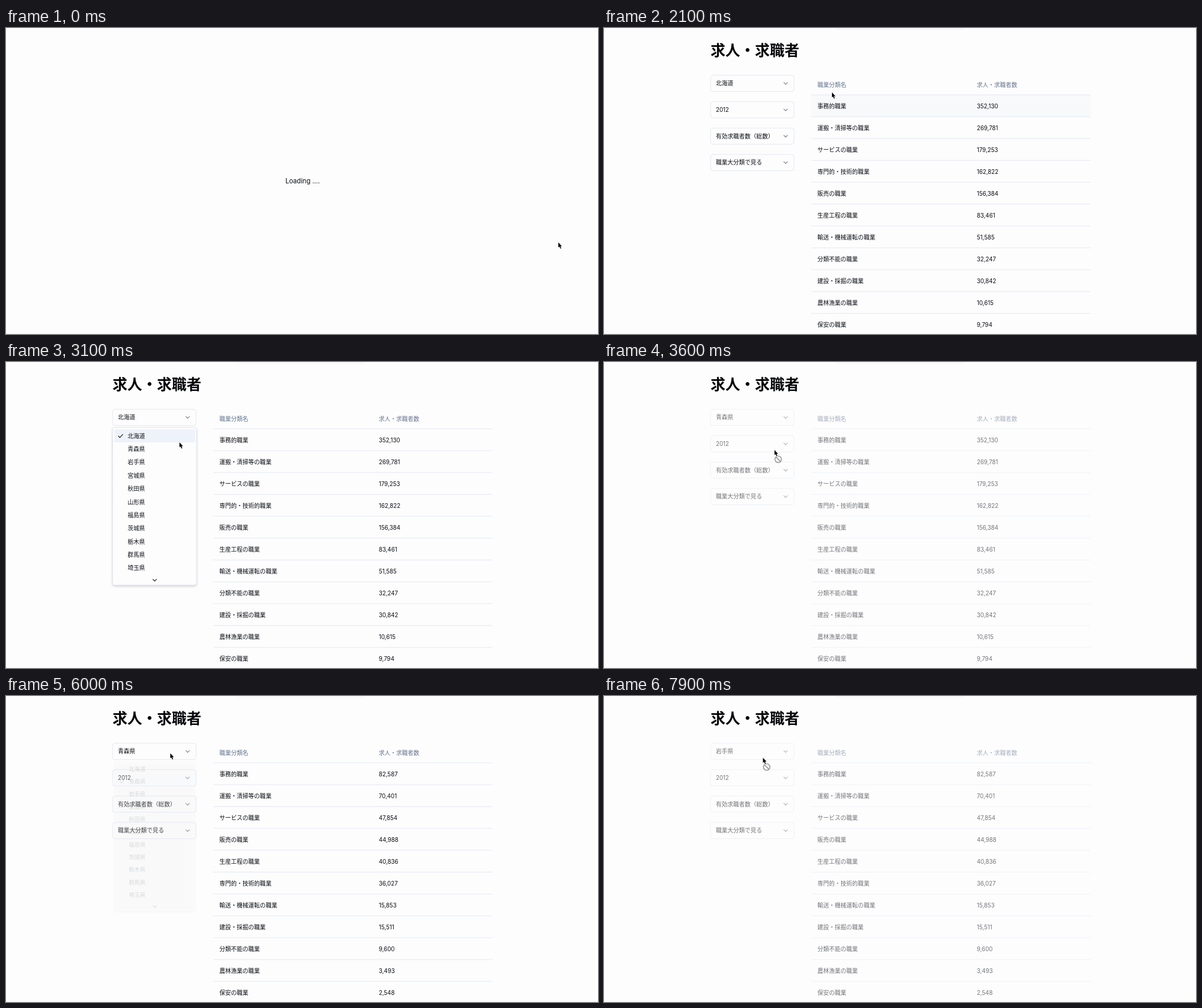
These frames come from a looping animation (1000 by 518 pixels, 8000 ms). An HTML page with a canvas:

```html
<!DOCTYPE html>
<html lang="ja">
<head>
<meta charset="utf-8">
<title>求人・求職者</title>
<style>
  html, body { margin: 0; width: 100%; height: 100%; overflow: hidden; background: #fdfdfe; }
  canvas { display: block; width: 1000px; height: 518px; }
</style>
</head>
<body>
<canvas id="stage"></canvas>
<script>
const W = 1000, H = 518, LOOP = 8000, STEP = 100;
const canvas = document.getElementById('stage');
const ratio = window.devicePixelRatio || 1;
canvas.width = W * ratio;
canvas.height = H * ratio;
const ctx = canvas.getContext('2d');

const JP = '"Noto Sans CJK JP", "Noto Sans CJK", sans-serif';
const LATIN = 'Inter, sans-serif';
const INK = '#0b0d12', MUTED = '#64748b', LINE = '#e4e8ee', PAPER = '#fdfdfe';
const SIZE = 9.78;

const PREFS = ['北海道', '青森県', '岩手県', '宮城県', '秋田県', '山形県', '福島県', '茨城県', '栃木県', '群馬県', '埼玉県'];
const FILTERS = ['2012', '有効求職者数（総数）', '職業大分類で見る'];
const TABLES = [
  [['事務的', '352,130'], ['運搬・清掃等の', '269,781'], ['サービスの', '179,253'], ['専門的・技術的', '162,822'],
   ['販売の', '156,384'], ['生産工程の', '83,461'], ['輸送・機械運転の', '51,585'], ['分類不能の', '32,247'],
   ['建設・採掘の', '30,842'], ['農林漁業の', '10,615'], ['保安の', '9,794']],
  [['事務的', '82,587'], ['運搬・清掃等の', '70,401'], ['サービスの', '47,854'], ['販売の', '44,988'],
   ['生産工程の', '40,836'], ['専門的・技術的', '36,027'], ['輸送・機械運転の', '15,853'], ['建設・採掘の', '15,511'],
   ['分類不能の', '9,600'], ['農林漁業の', '3,493'], ['保安の', '2,548']],
];

const TIMES = { ready: 1400, busy: [[3600, 5600], [6900, 8000]], menu: [[2700, 3600], [6000, 6900]] };

// Pointer path: time, x, y
const PATH = [
  [1800, 933, 363], [1900, 790, 298], [2000, 565, 190], [2100, 385, 109], [2200, 332, 98],
  [2350, 307, 94], [2500, 300, 93], [2800, 299, 94], [2900, 298, 106], [3100, 293, 136],
  [3500, 288, 149], [4100, 288, 149], [4350, 282, 123], [4600, 277, 96], [5600, 277, 96],
  [5700, 277.5, 97], [6000, 277.5, 97], [6200, 277, 124], [6400, 277.5, 160], [6600, 278, 178],
  [7600, 278, 178], [7750, 273, 143], [7900, 268.5, 104.5],
];

function pointerAt(t) {
  const next = PATH.findIndex(key => key[0] > t);
  if (next === 0) return PATH[0].slice(1);
  if (next < 0) return PATH[PATH.length - 1].slice(1);
  const a = PATH[next - 1], b = PATH[next], p = (t - a[0]) / (b[0] - a[0]);
  return [a[1] + (b[1] - a[1]) * p, a[2] + (b[2] - a[2]) * p];
}

const during = (ranges, t) => ranges.find(([from, to]) => t >= from && t < to);

// Text is placed by its left edge and vertical centre.
function text(str, x, cy, { size = SIZE, color = INK, weight = 400 } = {}) {
  const latin = /^[\x20-\x7e]+$/.test(str);
  ctx.font = `${weight} ${size}px ${latin ? LATIN : JP}`;
  ctx.fontKerning = latin ? 'normal' : 'none';
  ctx.fillStyle = color;
  ctx.fillText(str, x, cy + size * 0.37);
}

function box(x, y, w, h, r, fill, stroke) {
  ctx.beginPath();
  ctx.roundRect(x, y, w, h, r);
  if (fill) { ctx.fillStyle = fill; ctx.fill(); }
  if (stroke) { ctx.strokeStyle = stroke; ctx.lineWidth = 1; ctx.stroke(); }
}

function stroke(points, color, width) {
  ctx.beginPath();
  points.forEach(([x, y]) => ctx.lineTo(x, y));
  ctx.strokeStyle = color;
  ctx.lineWidth = width;
  ctx.lineCap = ctx.lineJoin = 'round';
  ctx.stroke();
}

const chevron = (cx, cy, color) =>
  stroke([[cx - 3, cy - 1.5], [cx, cy + 1.5], [cx + 3, cy - 1.5]], color, 1.1);

function drawFilters(pref) {
  [pref, ...FILTERS].forEach((label, i) => {
    const y = 80 + i * 44.67;
    box(180, y, 141, 27.5, 4, PAPER, LINE);
    text(label, 189, y + 13.8);
    chevron(306.8, y + 13.9, '#7b7f88');
  });
}

function drawTable(rows, hover) {
  text('職業分類名', 360.5, 96.6, { color: MUTED });
  text('求人・求職者数', 629.7, 96.6, { color: MUTED });
  rows.forEach(([name, count], i) => {
    const y = 113 + i * 37;
    if (i === hover) {
      ctx.fillStyle = '#f7f9fb';
      ctx.fillRect(350, y, 472, 37);
    }
    ctx.fillStyle = LINE;
    ctx.fillRect(350, y - 0.4, 472, 1);
    text(name + '職業', 360.5, y + 18.9);
    text(count, 629.7, y + 18.9);
  });
}

function drawMenu(selected, age, pointerY) {
  const opening = age < STEP;
  const pitch = 22.36;
  const over = Math.floor((pointerY - 114) / pitch);
  const active = over < 0 ? selected : over;
  ctx.save();
  if (opening) {
    ctx.globalAlpha = 0.13;
    ctx.translate(251, 3.6);
    ctx.scale(0.955, 0.955);
    ctx.translate(-251, 0);
  }
  ctx.save();
  ctx.shadowColor = 'rgba(0,0,0,.18)';
  ctx.shadowBlur = 4 * ratio;
  ctx.shadowOffsetY = 2 * ratio;
  box(180, 110.8, 142, 267, 4, PAPER);
  ctx.restore();
  box(180, 110.8, 142, 267, 4, PAPER, '#dfe3ea');
  box(183, 114 + active * pitch, 136.5, pitch, 2.5, '#eef2f9');
  PREFS.forEach((name, i) => text(name, 205.5, 125.1 + i * pitch));
  const cy = 125.1 + selected * pitch;
  stroke([[190, cy + 0.3], [192.3, cy + 2.7], [197.2, cy - 2.4]], INK, 1.1);
  chevron(251.2, 369.4, INK);
  ctx.restore();
}

function drawPointer(x, y, blocked) {
  ctx.save();
  ctx.translate(x, y);
  if (blocked) {
    ctx.beginPath();
    ctx.arc(6.3, 15.7, 5.5, 0, 7);
    ctx.fillStyle = '#f6f6f6';
    ctx.fill();
    ctx.strokeStyle = '#fff';
    ctx.lineWidth = 3;
    ctx.stroke();
    ctx.strokeStyle = '#999';
    ctx.lineWidth = 1.6;
    ctx.stroke();
    stroke([[2.6, 12], [10, 19.4]], '#999', 1.6);
  }
  const arrow = new Path2D('M0 0V8.6L1.9 6.9 3.4 10.6 4.9 10 3.4 6.4H6.1Z');
  ctx.lineJoin = 'round';
  ctx.strokeStyle = '#fff';
  ctx.lineWidth = 1.4;
  ctx.stroke(arrow);
  ctx.fillStyle = '#000';
  ctx.fill(arrow);
  ctx.restore();
}

function drawPage(t, x, y) {
  const busy = during(TIMES.busy, t), menu = during(TIMES.menu, t);
  const chosen = TIMES.busy.filter(([from]) => t >= from).length;
  const loaded = t >= TIMES.busy[0][1] ? 1 : 0;

  // The row highlight trails the pointer slightly.
  const [hx, hy] = pointerAt(t - 30);
  const hover = !menu && hx > 350 && hx < 822 ? Math.floor((hy - 113) / 37) : -1;

  box(392, -6, 216, 9.5, 4, '#f9f9fa');
  text('求人・求職者', 180, 38, { size: 25, weight: 700, color: '#050608' });
  ctx.globalAlpha = busy ? 0.56 : 1;
  drawFilters(PREFS[chosen]);
  drawTable(TABLES[loaded], hover);
  ctx.globalAlpha = 1;
  if (menu) drawMenu(chosen, t - menu[0], y);
  drawPointer(x, y, busy);
}

function draw(t) {
  const [x, y] = pointerAt(t);
  ctx.setTransform(ratio, 0, 0, ratio, 0, 0);
  ctx.fillStyle = PAPER;
  ctx.fillRect(0, 0, W, H);
  ctx.fillStyle = '#f8f8f9';
  ctx.fillRect(0, H - 1, W, 1);
  if (t < TIMES.ready) {
    text('Loading ....', 472, 259.2, { size: 11.15 });
    drawPointer(x, y, false);
  } else {
    drawPage(t, x, y);
  }
}

const start = performance.now();
function tick(now) {
  const t = Math.max(0, now - start) % LOOP;
  draw(Math.floor(t / STEP) * STEP);
  requestAnimationFrame(tick);
}
tick(start);
</script>
</body>
</html>
```
